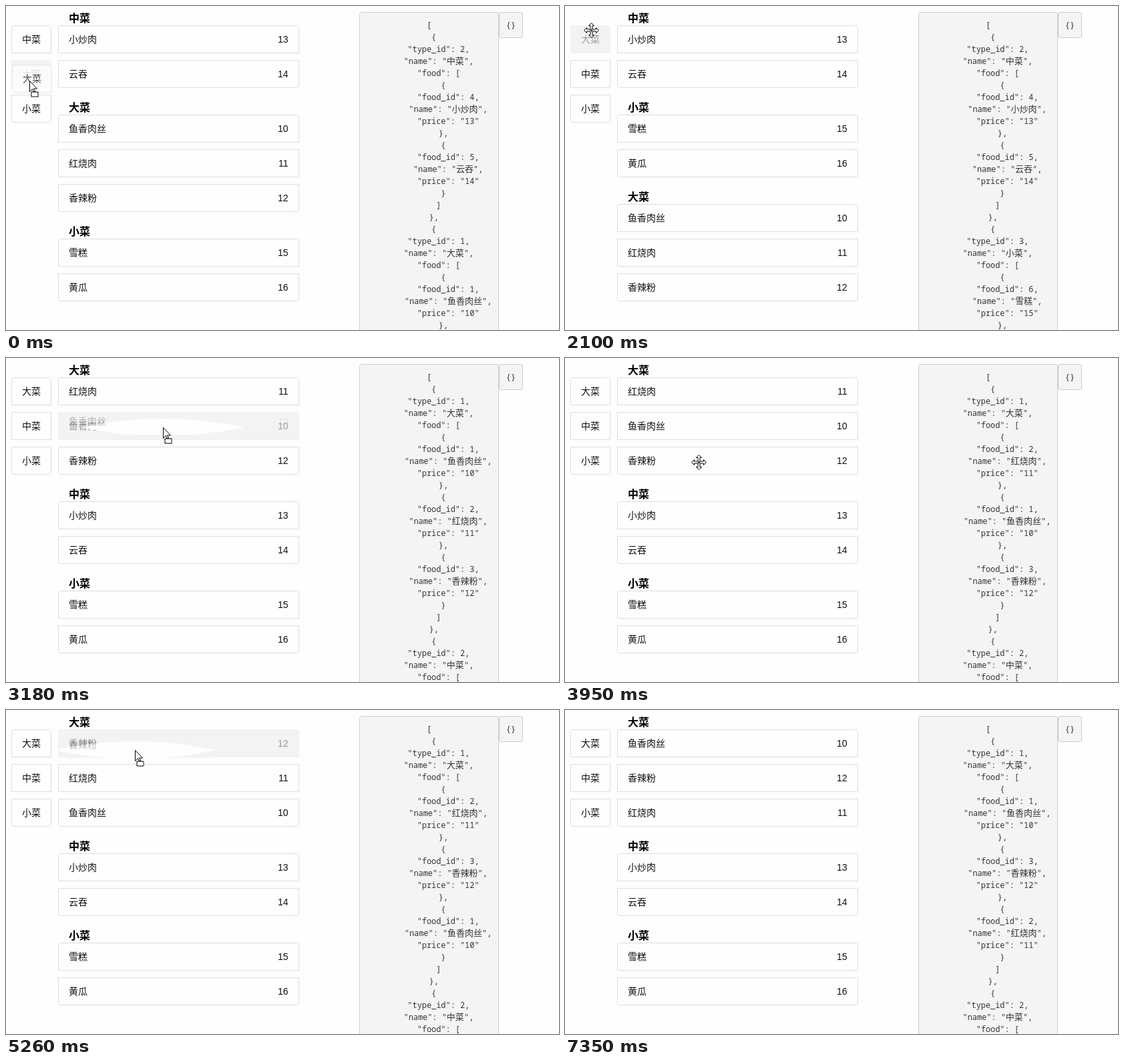
Write an HTML page that moves like this. It is 828 by 486 pixels and loops after 8100 ms.

```html
<!DOCTYPE html>
<html lang="zh-CN">
<head>
<meta charset="utf-8">
<title>Sortable menu</title>
<style>
  html, body { margin: 0; width: 100%; height: 100%; overflow: hidden; background: #fefefe; }
  svg { display: block; width: 828px; height: 486px; }
  text { font-family: "Liberation Sans", "Noto Sans CJK SC", "Noto Sans CJK", sans-serif; font-size: 14px; white-space: pre; }
  .dish { font-family: "Noto Sans CJK SC", "Noto Sans CJK", sans-serif; }
  .head { font-size: 16px; font-weight: 700; }
  .code { font-family: "Noto Sans Mono", "DejaVu Sans Mono", monospace; font-size: 11.92px; fill: #333; text-anchor: middle; }
  .code tspan { font-family: "Noto Sans CJK SC", "Noto Sans CJK", sans-serif; font-size: 13px; }
  .panel { fill: #f4f4f4; stroke: #ccc; }
</style>
</head>
<body>
<svg id="stage" viewBox="0 0 828 486"></svg>
<script>
const LOOP = 8100;
const stage = document.getElementById('stage');

const food = (food_id, name, price) => ({ food_id, name, price });
const TYPES = {
  1: { name: '大菜', food: [food(1, '鱼香肉丝', '10'), food(2, '红烧肉', '11'), food(3, '香辣粉', '12')] },
  2: { name: '中菜', food: [food(4, '小炒肉', '13'), food(5, '云吞', '14')] },
  3: { name: '小菜', food: [food(6, '雪糕', '15'), food(7, '黄瓜', '16')] }
};

const drag = (x, y) => ({ kind: 'drag', x, y });
const move = (x, y) => ({ kind: 'move', x, y });

// Each step changes some fields of the previous state.
// side, groups: type order; dishes, saved: order of type 1 on screen and in the data.
const STEPS = [
  [0, { side: '213', groups: '213', dishes: '123', saved: '123', held: 'type1', look: 'ghost', soft: false, grab: 3, cursor: drag(35, 112) }],
  [280, { side: '231', cursor: drag(37, 135) }],
  [530, { cursor: drag(39, 150) }],
  [780, { groups: '231', soft: true, cursor: move(39, 150) }],
  [1050, { look: 'fade' }],
  [1300, { look: '', soft: false }],
  [1580, { side: '213', look: 'ghost', grab: -4, cursor: drag(39, 98) }],
  [1830, { side: '123', cursor: drag(39, 37) }],
  [2100, { cursor: move(39, 37) }],
  [2350, { groups: '123', look: 'fade', soft: true }],
  [2620, { look: '', soft: false, cursor: move(235, 78) }],
  [2900, { cursor: move(235, 66) }],
  [3180, { dishes: '213', held: 'dish1', look: 'ghost', grab: 9, cursor: drag(235, 104) }],
  [3450, { saved: '213', look: 'fade', cursor: move(235, 108) }],
  [3700, { look: '', cursor: move(224, 130) }],
  [3950, { cursor: move(200, 157) }],
  [4220, { dishes: '231', held: 'dish3', look: 'ghost', grab: 3, cursor: drag(198, 118) }],
  [4490, { saved: '231', look: 'fade', cursor: move(197, 112) }],
  [4740, { look: '', cursor: move(195, 110) }],
  [5010, { look: 'ghost', grab: 8, cursor: drag(194, 98) }],
  [5260, { dishes: '321', cursor: drag(193, 60) }],
  [5510, { saved: '321', look: '', cursor: move(189, 128) }],
  [5780, { cursor: move(189, 159) }],
  [6050, { dishes: '312', held: 'dish1', look: 'ghost', grab: 5, cursor: drag(189, 108) }],
  [6300, { dishes: '132', cursor: drag(189, 52) }],
  [6570, { saved: '132', look: 'fade', cursor: move(189, 52) }],
  [6820, { look: '', cursor: move(368, 371) }],
  [7100, { cursor: { kind: 'beam', x: 692, y: 460 } }],
  [7350, { cursor: null }]
];

const foods = (type, order) =>
  type === '1' ? [...order].map(id => TYPES[1].food[id - 1]) : TYPES[type].food;

const label = (x, y, str, attrs = '') => `<text x="${x}" y="${y}" ${attrs}>${str}</text>`;

// Box whose top and bottom corners are rounded separately.
function box(x, y, w, top, bottom, attrs) {
  const a = top ? 3 : 0, b = bottom ? 3 : 0;
  return `<path d="M${x + .5} ${y + .5 + a}q0 ${-a} ${a} ${-a}h${w - 2 * a}q${a} 0 ${a} ${a}v${41 - a - b}` +
    `q0 ${b} ${-b} ${b}h${2 * b - w}q${-b} 0 ${-b} ${-b}z" stroke="#ddd" ${attrs}/>`;
}

function row(x, y, w, texts, first, last, look, ink) {
  const ghost = look === 'ghost';
  return `<g opacity="${ghost ? .4 : 1}">` +
    box(x, y, w, first, last, `fill="${ghost ? '#e3e3e3' : '#fefefe'}"`) +
    `<g fill="${look === 'fade' ? '#888' : ink}">${texts(y + 26)}</g></g>`;
}

const typeText = id => y => label(24, y, TYPES[id].name, 'class="dish"');
const dishText = d => y =>
  label(94, y, d.name, 'class="dish"') + label(422.5, y, d.price, 'text-anchor="end"');

function sidebar(s) {
  return [...s.side].map((id, i) => row(8, 29 + 52 * i, 59, typeText(id), i === 0, i === 2,
    s.held === 'type' + id ? s.look : '', s.soft && i === 1 ? '#333' : '#111')).join('');
}

function lists(s) {
  let y = 29, out = '';
  for (const id of s.groups) {
    out += label(94, y - 5, TYPES[id].name, 'class="dish head"');
    foods(id, s.dishes).forEach((d, i, all) => {
      out += row(78, y, 360, dishText(d), i === 0, i === all.length - 1,
        s.held === 'dish' + d.food_id ? s.look : '', s.soft ? '#333' : '#111');
      y += 52;
    });
    y += 30;
  }
  return out;
}

function json(s) {
  const data = [...s.groups].map(id =>
    ({ type_id: +id, name: TYPES[id].name, food: foods(id, s.saved) }));
  const lines = JSON.stringify(data, null, 2).split('\n').slice(0, 27);
  return '<rect class="panel" x="529.5" y="9.5" width="208" height="600" rx="3"/>' +
    '<rect class="panel" x="738.5" y="9.5" width="35" height="38" rx="3"/>' +
    label(756, 33, '{}', 'class="code"') +
    lines.map((line, i) => {
      const str = line.trimStart(), indent = line.length - str.length;
      return label(633.5 + indent * 3.575, 33 + 18 * i,
        str.replace(/[\u4e00-\u9fff]+/g, '<tspan>$&</tspan>'), 'class="code"');
    }).join('');
}

// Translucent copy that follows the pointer during a drag.
function dragImage(s) {
  const { x, y } = s.cursor, mid = y - s.grab, id = s.held.slice(-1);
  if (s.held.startsWith('type')) {
    return `<g opacity=".68" transform="translate(1 0)">` +
      box(8, mid - 21, 59, true, true, 'fill="#fff"') + typeText(id)(mid + 5) + '</g>';
  }
  const dish = TYPES[1].food[id - 1];
  return `<clipPath id="edge"><rect x="79" y="${mid - 21}" width="359" height="42"/></clipPath>` +
    `<g clip-path="url(#edge)"><path d="M${x - 122} ${y}Q${x} ${y - 26} ${x + 122} ${y}Q${x} ${y + 26} ${x - 122} ${y}" fill="#fefefe"/>` +
    `<path d="M${x - 125} ${mid + 20.5}h240" stroke="#f8f8f8"/></g>` +
    label(94, mid + 5, dish.name, 'class="dish" opacity=".25"') +
    label(422.5, mid + 5, dish.price, 'text-anchor="end" opacity=".06"');
}

// Pointer outlines, drawn around their hot spot.
const ARROW = '<path d="M.5 .5v16l4-4 3 6.500 2-1-3-6h5z" fill="#fff" stroke="#000"/>' +
  '<rect x="3" y="17" width="10" height="7" fill="#fff" stroke="#000" stroke-width="2" stroke-dasharray="1 1"/>';
const CROSS = '<path d="M0-11l4 4h-2.500v5.500h5.500v-2.500l4 4-4 4v-2.500h-5.500v5.500h2.500l-4 4-4-4h2.500v-5.500h-5.500v2.500l-4-4 4-4v2.500h5.500v-5.500h-2.500z" ' +
  'transform="translate(.5 -.5)" fill="#fff" stroke="#000"/><path d="M-1.500-.5h4M.5-2.500v4" stroke="#000"/>';
const BEAM = '<path d="M-2.500-8h2.500l.5.5.5-.5h2.500M.5-7.500v16M-2.500 9h2.500l.5-.5.5.5h2.500" fill="none" stroke="#000"/>';
const SHAPES = { drag: ARROW, move: CROSS, beam: BEAM };

const pointer = c => `<g transform="translate(${c.x} ${c.y})">${SHAPES[c.kind]}</g>`;

function draw(s) {
  const dragging = s.cursor && s.cursor.kind === 'drag';
  stage.innerHTML = sidebar(s) + lists(s) + json(s) +
    (dragging ? dragImage(s) : '') + (s.cursor ? pointer(s.cursor) : '');
}

let state = {};
const states = STEPS.map(([, change]) => state = { ...state, ...change });

const start = performance.now();
let shown = -1;
function frame() {
  const t = (performance.now() - start) % LOOP;
  const index = STEPS.filter(([from]) => from <= t).length - 1;
  if (index !== shown) draw(states[shown = index]);
  requestAnimationFrame(frame);
}
frame();
</script>
</body>
</html>
```
